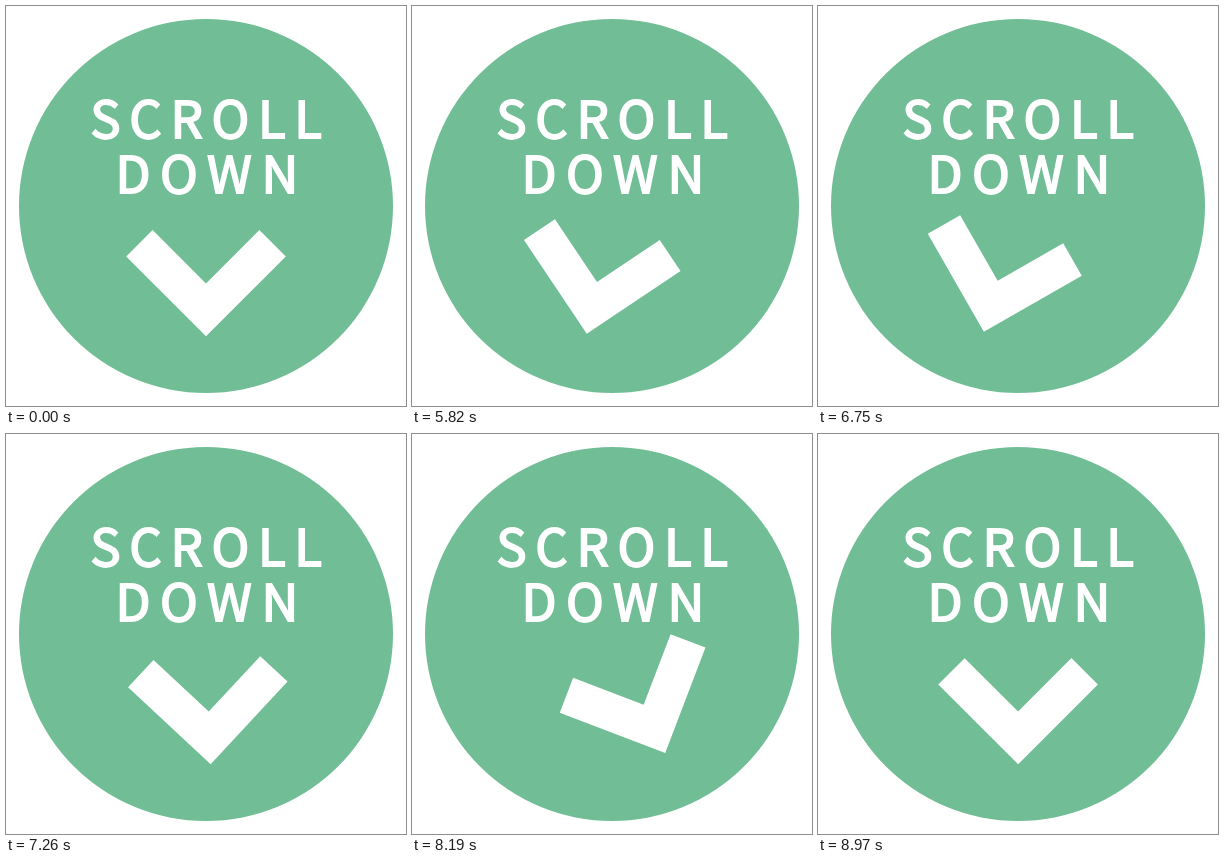
Recreate the animation shown at these times as an HTML page with a canvas. Size 400 px wide and 400 px high, loop 9 s.

```html
<!DOCTYPE html>
<html lang="en">
<head>
<meta charset="utf-8">
<title>Scroll down</title>
<style>
  html, body { margin: 0; width: 100%; height: 100%; overflow: hidden; background: #fff; }
  canvas { display: block; width: 400px; height: 400px; }
</style>
</head>
<body>
<canvas id="stage" width="400" height="400"></canvas>
<script>
const ctx = document.getElementById('stage').getContext('2d');
const LOOP = 9000, STEP = 30;
const GREEN = '#70bd96', WHITE = '#fff';
const SWING = 24.8;
const FONT = '400 51px "Noto Sans CJK JP", "Noto Sans CJK", "Noto Sans", sans-serif';
const CHEVRON = [[-79.8, 50.5], [-53.4, 24.1], [0, 77.5], [53.4, 24.1], [79.8, 50.5], [0, 130.3]];

// Time, angle, and the normalised speed on either side of each pose.
const KEYS = [
  { t: 5400, a: 0, out: 0 },
  { t: 6300, a: SWING, in: 0, out: 0 },
  { t: 7200, a: 0, in: 0.9, out: 1.2 },
  { t: 8100, a: -SWING, in: 0, out: 0 },
  { t: 9000, a: 0, in: 0 }
];

function ease(u, m0, m1) {
  const u2 = u * u, u3 = u2 * u;
  return 3 * u2 - 2 * u3 + m0 * (u3 - 2 * u2 + u) + m1 * (u3 - u2);
}

function angleAt(t) {
  const i = KEYS.findIndex(k => k.t > t);
  if (i < 1) return 0;
  const p = KEYS[i - 1], q = KEYS[i];
  return p.a + (q.a - p.a) * ease((t - p.t) / (q.t - p.t), p.out, q.in);
}

// Track the letters so the ink runs from left to right; the outline gives a medium weight.
function line(text, left, right, baseline) {
  ctx.font = FONT;
  ctx.letterSpacing = '0px';
  const m = ctx.measureText(text);
  const ink = m.actualBoundingBoxLeft + m.actualBoundingBoxRight;
  const gap = (right - left - ink) / (text.length - 1);
  ctx.letterSpacing = gap.toFixed(2) + 'px';
  const x = left + m.actualBoundingBoxLeft;
  ctx.fillText(text, x, baseline);
  ctx.strokeText(text, x, baseline);
}

function chevron(angle) {
  ctx.save();
  ctx.translate(200, 200);
  ctx.rotate(angle * Math.PI / 180);
  ctx.beginPath();
  CHEVRON.forEach(([x, y]) => ctx.lineTo(x, y));
  ctx.fill();
  ctx.restore();
}

function draw(now) {
  const t = Math.floor((now % LOOP) / STEP) * STEP;
  ctx.fillStyle = WHITE;
  ctx.fillRect(0, 0, 400, 400);
  ctx.fillStyle = GREEN;
  ctx.beginPath();
  ctx.arc(200, 200, 187, 0, Math.PI * 2);
  ctx.fill();
  ctx.fillStyle = ctx.strokeStyle = WHITE;
  ctx.lineWidth = 1.8;
  line('SCROLL', 86.3, 315.2, 131.7);
  line('DOWN', 114.4, 287.4, 186.6);
  chevron(angleAt(t));
}

function tick() {
  draw(performance.now());
  requestAnimationFrame(tick);
}
tick();
</script>
</body>
</html>
```
